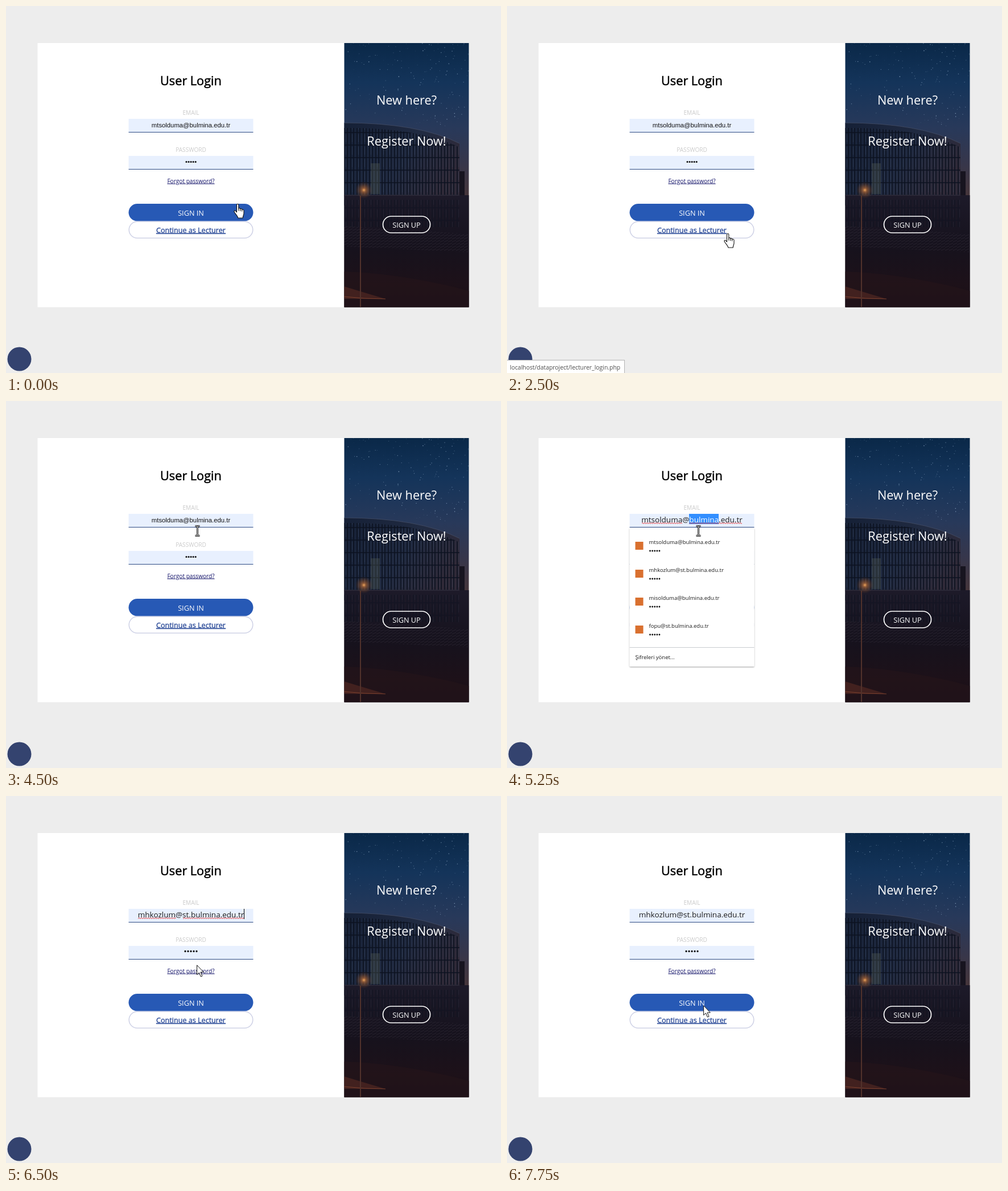
Write an HTML page that moves like this. It is 870x644 px and loops after 8000 ms.

```html
<!DOCTYPE html>
<html lang="en">
<head>
<meta charset="utf-8">
<title>User Login</title>
<style>
html, body { margin: 0; width: 100%; height: 100%; overflow: hidden; background: #ededed; }
svg { display: block; }
text { font-family: "Open Sans", sans-serif; }
.mid { text-anchor: middle; }
.big { font-size: 21.7px; }
.label { font-size: 10.1px; fill: #cbcbcb; }
.button { font-size: 12.7px; fill: #fff; }
.system { font: 11.3px "Liberation Sans", sans-serif; fill: #111; }
.typed { font-size: 13.5px; fill: #1c1c1c; }
.small { font-size: 9.5px; fill: #1c1c1c; }
.dots { stroke: #111; stroke-linecap: round; fill: none; }

/* Every change is a hard step on one shared 8 s clock. */
.step { animation: 8s step-end infinite; }
#mail-saved { animation-name: mail-saved; }
#mail-focus { animation-name: mail-focus; }
#mail-selected { animation-name: mail-selected; }
#mail-preview, #highlight { animation-name: preview; }
#mail-new, #dots-new { animation-name: filled; }
#dots-saved { animation-name: dots-saved; }
#misspelt { animation-name: misspelt; }
#caret { animation-name: caret; }
#menu { animation-name: menu; }
#status { animation-name: status; }
#cursor { animation-name: move; }
#arrow { animation-name: arrow; }
#hand { animation-name: hand; }
#beam { animation-name: beam; }

@keyframes mail-saved { 0% { opacity: 1 } 59.375%, 100% { opacity: 0 } }
@keyframes mail-focus { 0%, 65.625%, 100% { opacity: 0 } 59.375% { opacity: 1 } }
@keyframes mail-selected { 0%, 75%, 100% { opacity: 0 } 65.625% { opacity: 1 } }
@keyframes preview { 0%, 81.25%, 100% { opacity: 0 } 75% { opacity: 1 } }
@keyframes filled { 0% { opacity: 0 } 81.25%, 100% { opacity: 1 } }
@keyframes dots-saved { 0% { opacity: 1 } 81.25%, 100% { opacity: 0 } }
@keyframes misspelt { 0%, 93.75%, 100% { opacity: 0 } 81.25% { opacity: 1 } }
@keyframes caret { 0%, 87.5%, 100% { opacity: 0 } 81.25% { opacity: 1 } }
@keyframes menu { 0%, 81.25%, 100% { opacity: 0 } 59.375% { opacity: 1 } }
@keyframes status {
  0%, 50%, 100% { opacity: 0 }
  28.125%, 46.875% { opacity: .5 }
  31.25% { opacity: 1 }
}
@keyframes arrow {
  0%, 25%, 56.25%, 90.625% { opacity: 0 }
  3.125%, 53.125%, 75%, 96.875%, 100% { opacity: 1 }
}
@keyframes hand {
  0%, 25%, 90.625% { opacity: 1 }
  3.125%, 53.125%, 96.875%, 100% { opacity: 0 }
}
@keyframes beam { 0%, 75%, 100% { opacity: 0 } 56.25% { opacity: 1 } }
@keyframes move {
  0% { transform: translate(400px, 347px) }
  3.125% { transform: translate(388px, 333px) }
  18.75% { transform: translate(388px, 330px) }
  21.875% { transform: translate(391px, 336px) }
  25% { transform: translate(386px, 369px) }
  28.125% { transform: translate(381px, 399px) }
  43.75% { transform: translate(363px, 379px) }
  46.875% { transform: translate(359px, 366px) }
  53.125% { transform: translate(336px, 271px) }
  56.25% { transform: translate(336px, 228px) }
  75% { transform: translate(335px, 296px) }
  87.5% { transform: translate(337px, 337px) }
  90.625% { transform: translate(356px, 366px) }
  96.875%, 100% { transform: translate(345px, 367px) }
}
</style>
</head>
<body>
<svg width="870" height="644">
  <defs>
    <linearGradient id="sky" x2="0" y2="1">
      <stop offset="0" stop-color="#0a2848"/>
      <stop offset=".15" stop-color="#14345a"/>
      <stop offset=".32" stop-color="#28395a"/>
      <stop offset=".46" stop-color="#37364a"/>
      <stop offset=".58" stop-color="#46353a"/>
      <stop offset=".66" stop-color="#1c151f"/>
      <stop offset="1" stop-color="#150d17"/>
    </linearGradient>
    <linearGradient id="facade" x2="1" y2=".5">
      <stop offset="0" stop-color="#152036"/>
      <stop offset=".6" stop-color="#212b42"/>
      <stop offset="1" stop-color="#302a38"/>
    </linearGradient>
    <linearGradient id="ground" x2="0" y2="1">
      <stop offset="0" stop-color="#1d1a29"/>
      <stop offset=".45" stop-color="#16121d"/>
      <stop offset=".8" stop-color="#1d1119"/>
      <stop offset="1" stop-color="#160d15"/>
    </linearGradient>
    <radialGradient id="glow">
      <stop offset="0" stop-color="#f0a860"/>
      <stop offset=".25" stop-color="#a86436" stop-opacity=".75"/>
      <stop offset="1" stop-color="#633822" stop-opacity="0"/>
    </radialGradient>
    <pattern id="panes" width="11" height="22" patternUnits="userSpaceOnUse">
      <path d="M1 0V22M6 0V22M0 2H11" stroke="#0b111f" stroke-width="1.6"/>
      <path d="M3.5 5V19" stroke="#38445a" stroke-opacity=".45"/>
    </pattern>
    <pattern id="fence" width="7" height="5" patternUnits="userSpaceOnUse">
      <path d="M0 4L7 1" stroke="#3a3441" stroke-opacity=".45"/>
    </pattern>
    <pattern id="wave" y="213" width="4" height="3" patternUnits="userSpaceOnUse">
      <path d="M0 2.3L2 .7L4 2.3" fill="none" stroke="#e33b3b"/>
    </pattern>
    <filter id="shadow" x="-5%" y="-5%" width="110%" height="110%">
      <feDropShadow dx="0" dy="1" stdDeviation="1.3" flood-opacity=".38"/>
    </filter>
    <clipPath id="panel"><path d="M594.5 65h219v463.5h-219z"/></clipPath>
  </defs>

  <rect width="870" height="644" fill="#ededed"/>
  <rect x="55.5" y="65" width="758" height="463.5" fill="#fff"/>

  <g clip-path="url(#panel)">
    <rect x="594" y="65" width="220" height="464" fill="url(#sky)"/>
    <g id="stars" fill="#a9c4df"></g>
    <path id="tower" d="M594 205Q725 205 797 241V350H594Z" fill="url(#facade)"/>
    <path d="M594 214Q725 213 797 248V334H594Z" fill="url(#panes)"/>
    <path d="M594 205Q725 205 797 241" fill="none" stroke="#48526a" stroke-opacity=".7"/>
    <path d="M641 276h16v54h-16z" fill="#5b6557" opacity=".32"/>
    <path d="M797 290h9v60h-9z" fill="#17141f"/>
    <path d="M594 332H814V529H594Z" fill="url(#ground)"/>
    <path d="M594 332H797" stroke="#4a4654" stroke-opacity=".7"/>
    <path d="M594 340h203v48H594z" fill="url(#panes)" opacity=".5"/>
    <path d="M594 386L814 400V432L594 422Z" fill="url(#fence)"/>
    <path d="M594 466Q700 470 814 500V529H594Z" fill="#24141b" opacity=".7"/>
    <path d="M594 492Q630 503 667 514H594Z" fill="#6b3326" opacity=".45"/>
    <path d="M594 510Q630 514 667 514" fill="none" stroke="#a3573a" stroke-opacity=".6"/>
    <path d="M623 333V528" stroke="#51322b" stroke-width="2"/>
    <circle cx="629" cy="323" r="15" fill="url(#glow)"/>
  </g>

  <g class="mid">
    <text class="big" x="325" y="139" stroke="#000" stroke-width=".55">User Login</text>
    <text class="big" x="704" y="172.5" fill="#fff">New here?</text>
    <text class="big" x="704" y="245" fill="#fff">Register Now!</text>
    <rect x="662.5" y="369" width="83" height="29" rx="14.5" fill="none" stroke="#fff" stroke-width="1.7"/>
    <text class="button" x="704" y="388.5">SIGN UP</text>

    <text class="label" x="325" y="190.5">EMAIL</text>
    <text class="label" x="325" y="255.5">PASSWORD</text>
    <path d="M215.5 198h219v23h-219zM215.5 263h219v23h-219z" fill="#e8f0fe"/>
    <path d="M215.5 221.5h219M215.5 286.5h219" stroke="#2c4a83"/>
    <text x="325" y="310.5" font-size="10.15" fill="#15156b" text-decoration="underline">Forgot password?</text>
    <rect x="215.5" y="347" width="219" height="30.5" rx="15.25" fill="#2759b5"/>
    <text class="button" x="325" y="367.5">SIGN IN</text>
    <rect x="216.2" y="378.2" width="217.6" height="29" rx="14.5" fill="#fff" stroke="#cfd2e6" stroke-width="1.5"/>
    <text x="325" y="397.7" font-size="12.6" fill="#2a4a98" stroke="#2a4a98" stroke-width=".35" text-decoration="underline">Continue as Lecturer</text>

    <text id="mail-saved" class="step system" x="325" y="212.5">mtsolduma@bulmina.edu.tr</text>
    <text id="mail-focus" class="step typed" x="325" y="212.5">mtsolduma@bulmina.edu.tr</text>
    <g id="mail-selected" class="step">
      <rect x="320" y="198" width="52" height="18" fill="#338fff"/>
      <text class="typed" x="325" y="212.5">mtsolduma@<tspan fill="#fff">bulmina</tspan>.edu.tr</text>
      <path d="M237 213h71v3h-71zM320 213h93v3h-93z" fill="url(#wave)"/>
    </g>
    <text id="mail-preview" class="step system" x="325" y="212.5">mhkozlum@st.bulmina.edu.tr</text>
    <text id="mail-new" class="step typed" x="325" y="212.5">mhkozlum@st.bulmina.edu.tr</text>
    <path id="misspelt" class="step" d="M232 213h67v3h-67zM311 213h107v3h-107z" fill="url(#wave)"/>
    <path id="caret" class="step" d="M418.5 198V216" stroke="#000"/>
    <path id="dots-saved" class="step dots" d="M317 273.5h17" stroke-width="3.2" stroke-dasharray="0 4.05"/>
    <path id="dots-new" class="step dots" d="M315 272.5h21" stroke-width="3.3" stroke-dasharray="0 5"/>
  </g>

  <circle cx="23.5" cy="619.5" r="21" fill="#34436f"/>

  <g id="menu" class="step">
    <rect x="215.5" y="222.5" width="219" height="243.5" rx="1.5" fill="#fff" filter="url(#shadow)"/>
    <path id="highlight" class="step" d="M215.5 278h219v49h-219z" fill="#ececec"/>
    <g id="accounts"></g>
    <path d="M215.5 432.5h219" stroke="#c9ccd0"/>
    <text class="small" x="225.5" y="452.5">Şifreleri yönet...</text>
  </g>

  <g id="status" class="step">
    <rect x="-.5" y="621.5" width="207" height="24" fill="#fff" stroke="#b3b3b3"/>
    <text x="5" y="638" font-size="10.4" fill="#4d4d4d">localhost/dataproject/lecturer_login.php</text>
  </g>

  <g id="cursor" class="step">
    <path id="arrow" class="step" d="M.6 .8V17.6L4.4 14L7.4 21L10 19.9L7 13.1H12.3Z" fill="#fff" stroke="#111"/>
    <g id="hand" class="step" stroke="#111" stroke-width="1.1" stroke-linejoin="round">
      <path d="M5.5 2C5.5 0 8.8 0 8.8 2V8C9.8 7.2 11.6 7.6 11.8 9C12.9 8.3 14.5 8.8 14.7 10.2C16 9.6 18 10.3 18 12V17C18 19.5 16.5 21 16.2 25H7.8C7.6 22 3.2 18 1.3 14.5C.2 12.4 2.3 11.2 3.8 12.8L5.5 14.8Z" fill="#fff"/>
      <path d="M8.8 8V12.5M11.8 9V13M14.7 10.2V13.5" fill="none"/>
    </g>
    <g id="beam" class="step" fill="none">
      <path id="stem" d="M-3.5 -8.5H-1L.5 -7.5L2 -8.5H4.5M.5 -7.5V7.5M-3.5 8.5H-1L.5 7.5L2 8.5H4.5" stroke="#111" stroke-width="3"/>
      <use href="#stem" style="display:none"/>
      <path d="M-3.5 -8.5H-1L.5 -7.5L2 -8.5H4.5M.5 -7.5V7.5M-3.5 8.5H-1L.5 7.5L2 8.5H4.5" stroke="#fff"/>
    </g>
  </g>
</svg>
<script>
const byId = id => document.getElementById(id);

const accounts = [
  'mtsolduma@bulmina.edu.tr',
  'mhkozlum@st.bulmina.edu.tr',
  'misolduma@bulmina.edu.tr',
  'fopu@st.bulmina.edu.tr'
];
byId('accounts').innerHTML = accounts.map((mail, i) => `
  <g transform="translate(0 ${i * 49})">
    <rect x="225.5" y="247" width="14" height="14" fill="#d9702f"/>
    <text class="small" x="249.5" y="250.5">${mail}</text>
    <path class="dots" d="M251.5 263h17" stroke-width="2.9" stroke-dasharray="0 4.1"/>
  </g>`).join('');

let seed = 7;
const random = () => (seed = seed * 16807 % 2147483647) / 2147483647;
let stars = '';
for (let i = 0; i < 170; i++) {
  const x = 594 + random() * 220, y = 65 + random() ** 1.3 * 150;
  stars += `<circle cx="${x}" cy="${y}" r="${.3 + random() * .5}" opacity="${.2 + random() * .5}"/>`;
}
byId('stars').innerHTML = stars;
</script>
</body>
</html>
```
